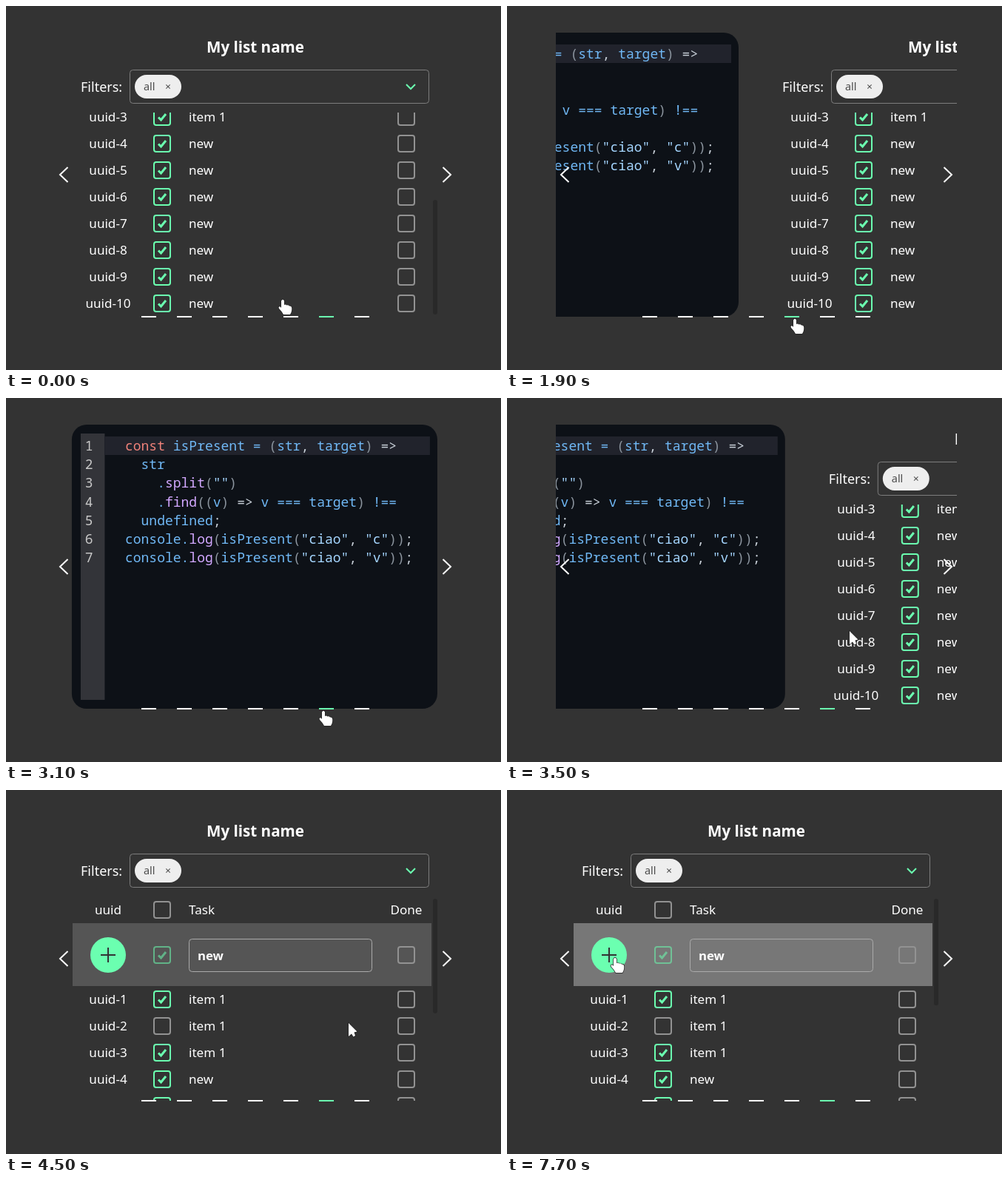
Write an HTML page with a canvas that moves like this. It is 669x492 px and loops after 8 s.

```html
<!DOCTYPE html>
<html lang="en">
<head>
<meta charset="utf-8">
<title>List carousel</title>
<style>
  html, body { margin: 0; width: 100%; height: 100%; overflow: hidden; background: #333; }
  canvas { display: block; }
</style>
</head>
<body>
<canvas id="stage" width="669" height="492"></canvas>
<script>
const ctx = document.getElementById('stage').getContext('2d');
const LOOP = 8000, STEP = 100, PITCH = 542;
const BG = '#333333', GREEN = '#6bffb0', GREY = '#929292';
const SANS = '"Noto Sans", "Open Sans", sans-serif';
const MONO = '18px "Noto Sans Mono", monospace';
const VIEW = { top: 144, height: 276 };
const ROW = 36, FIRST_ROW = 265, MAX_SCROLL = 205;

const HAND = new Path2D('M-2 1.5Q0-2 2 1.5V7Q4 6 5.4 7.6Q7.5 6.8 8.8 8.6Q12 8 12.2 11V14Q12 17 10 20H1Q-1 16-5 12Q-6.3 10-4.5 9.2Q-3 9-2 11Z');
const ARROW = new Path2D('M0 0L11.5 11.5L7.5 12.5L9 17L6.5 18.5L4 14.5L0 18Z');

// Cursor path: time, x, y of the hot spot
const PATH = [
  [0, 374, 397], [300, 352, 410], [700, 421, 424], [900, 402, 424], [1100, 389, 423],
  [2500, 389, 423], [2900, 429, 423], [3100, 429, 423], [3400, 463, 315],
  [5100, 463, 315], [5700, 363, 231],
  [7000, 363, 231], [7350, 245, 238], [7700, 146, 227]
];

const COLORS = {
  k: '#f0827a', b: '#70b8f5', g: '#8b949e', w: '#c9d1d9', f: '#d2a8ff', s: '#a5d6ff'
};
// Each token is a colour key followed by its text
const CODE = [
  ['kconst ', 'bisPresent = ', 'g(', 'bstr', 'w, ', 'btarget', 'g) ', 'w=>'],
  ['b  str'],
  ['b    .', 'fsplit', 'g(', 's""', 'g)'],
  ['b    .', 'ffind', 'g((', 'bv', 'g) ', 'w=> ', 'bv === target', 'g) ', 'b!=='],
  ['b  undefined', 'w;'],
  ...['"c"', '"v"'].map(arg => [
    'bconsole.', 'flog', 'g(', 'bisPresent', 'g(', 's"ciao"', 'w, ', 's' + arg, 'g))', 'w;'
  ])
];

function easeInOut(x) {
  if (x <= 0) return 0;
  if (x >= 1) return 1;
  let lo = 0, hi = 1;
  for (let i = 0; i < 24; i++) {
    const u = (lo + hi) / 2, v = 1 - u;
    if (1.26 * u * v * v + 1.74 * u * u * v + u * u * u < x) lo = u; else hi = u;
  }
  return lo * lo * (3 - 2 * lo);
}

function cursorAt(t) {
  const i = PATH.findIndex(p => p[0] > t);
  if (i < 0) return PATH[PATH.length - 1].slice(1);
  const [t0, x0, y0] = PATH[i - 1], [t1, x1, y1] = PATH[i];
  const k = (t - t0) / (t1 - t0);
  return [x0 + (x1 - x0) * k, y0 + (y1 - y0) * k];
}

function box(x, y, w, h, r, fill, stroke, width = 1) {
  ctx.beginPath();
  ctx.roundRect(x, y, w, h, r);
  if (fill) { ctx.fillStyle = fill; ctx.fill(); }
  if (stroke) { ctx.strokeStyle = stroke; ctx.lineWidth = width; ctx.stroke(); }
}

function line(points, color, width) {
  ctx.beginPath();
  points.forEach(([x, y]) => ctx.lineTo(x, y));
  ctx.strokeStyle = color;
  ctx.lineWidth = width;
  ctx.stroke();
}

function label(text, x, y, { size = 17.1, bold = false, align = 'left', color = '#fff' } = {}) {
  ctx.font = `${bold ? 'bold ' : ''}${size}px ${SANS}`;
  ctx.textAlign = align;
  ctx.fillStyle = color;
  ctx.fillText(text, x, y);
}

function clip(x, y, w, h) {
  ctx.beginPath();
  ctx.rect(x, y, w, h);
  ctx.clip();
}

function checkbox(cx, cy, checked) {
  box(cx - 11, cy - 11, 22, 22, 3, null, checked ? GREEN : GREY, 2);
  if (checked) line([[cx - 5, cy + .5], [cx - 1.5, cy + 4], [cx + 5, cy - 4]], GREEN, 3);
}

function listRow(id, task, checked, cy) {
  label(id, 138, cy + 6, { align: 'center' });
  checkbox(211, cy, checked);
  label(task, 247, cy + 6);
  checkbox(541, cy, false);
}

function addRow(s) {
  ctx.fillStyle = s.hover ? '#777777' : '#555555';
  ctx.fillRect(90, 180, 485, 85);
  ctx.fillStyle = GREEN;
  ctx.beginPath();
  ctx.arc(138, 223, 24, 0, 7);
  ctx.fill();
  line([[128, 223], [148, 223]], BG, 2);
  line([[138, 213], [138, 233]], BG, 2);
  ctx.globalAlpha = .55;
  checkbox(211, 223, true);
  ctx.globalAlpha = 1;
  checkbox(541, 223, false);
  if (s.focus) {
    ctx.save();
    ctx.shadowColor = GREEN;
    ctx.shadowBlur = 4;
    box(247, 200.5, 249, 46, 4, null, GREEN, 2);
    ctx.restore();
  } else {
    box(247.5, 201.5, 247, 44, 4, null, '#aaaaaa');
  }
  label('new', 259, 229.5, { size: 16.8, bold: true });
  if (s.caret) {
    ctx.fillStyle = '#fff';
    ctx.fillRect(294, 213, 1, 20);
  }
}

function drawList(s) {
  label('My list name', 337, 63, { size: 20.6, bold: true, align: 'center' });
  label('Filters:', 101, 115.5, { size: 18 });
  box(167.5, 86.5, 404, 45, 4, null, '#7d7d7d');
  box(174, 93, 63, 32, 16, '#eeeeee');
  label('all', 186, 114, { size: 14.4, color: '#4a4a4a' });
  line([[216.3, 106.3], [221.7, 111.7]], '#555', 1.1);
  line([[221.7, 106.3], [216.3, 111.7]], '#555', 1.1);
  line([[541, 106], [547, 112], [553, 106]], GREEN, 2);

  ctx.save();
  clip(60, VIEW.top, 540, VIEW.height);
  ctx.save();
  ctx.translate(0, -s.scroll);
  label('uuid', 138, 168, { align: 'center' });
  checkbox(211, 162, false);
  label('Task', 247, 168);
  label('Done', 541, 168, { align: 'center' });
  addRow(s);
  for (let i = 1; i <= s.rows; i++) {
    listRow('uuid-' + i, i < 4 ? 'item 1' : 'new', i !== 2, FIRST_ROW + ROW * (i - .5));
  }
  ctx.restore();
  const total = FIRST_ROW - VIEW.top + ROW * s.rows, track = 270;
  box(577, 147 + s.scroll / total * track, 6, VIEW.height / total * track, 3, '#292929');
  ctx.restore();
}

function drawCode() {
  box(90, 36, 494, 384, 20, '#0d1117');
  ctx.fillStyle = '#333439';
  ctx.fillRect(102, 48, 32.5, 360);
  ctx.fillStyle = '#21232c';
  ctx.fillRect(134.5, 52, 439.5, 25);
  ctx.font = MONO;
  ctx.textAlign = 'left';
  CODE.forEach((tokens, i) => {
    const y = 71 + i * 25.2;
    let x = 162;
    ctx.fillStyle = '#c8c8c8';
    ctx.fillText(i + 1, 107.7, y);
    for (const token of tokens) {
      const text = token.slice(1);
      ctx.fillStyle = COLORS[token[0]];
      ctx.fillText(text, x, y);
      x += ctx.measureText(text).width;
    }
  });
}

function drawCursor(t, x, y) {
  ctx.save();
  ctx.translate(x, y);
  if (t >= 5200 && x > 246 && y < 247) {
    for (const [color, width] of [['#ffffff', 3], ['#222222', 1]]) {
      line([[0, -8], [0, 8]], color, width);
      line([[-3, -8], [3, -8]], color, width);
      line([[-3, 8], [3, 8]], color, width);
    }
  } else {
    const hand = t < 3100 || y > 416 || x < 162;
    const shape = hand ? HAND : ARROW;
    ctx.strokeStyle = '#222222';
    ctx.lineWidth = 1.4;
    ctx.stroke(shape);
    ctx.fillStyle = '#fff';
    ctx.fill(shape);
  }
  ctx.restore();
}

function draw(t) {
  const [cx, cy] = cursorAt(t);
  const slide = PITCH * (easeInOut((t - 1400) / 1000) - easeInOut((t - 3068) / 1000));
  const focus = t >= 5600 && t < 7600;
  const state = {
    scroll: t < 4500 ? MAX_SCROLL : 0,
    rows: t < 7700 ? 10 : 11,
    hover: t >= 5200 && cy < FIRST_ROW,
    focus,
    caret: focus && (t < 5700 || Math.floor((t - 5700) / 600) % 2 === 0)
  };

  ctx.fillStyle = BG;
  ctx.fillRect(0, 0, 669, 492);

  ctx.save();
  clip(66, 36, 542, 384);
  ctx.translate(slide, 0);
  if (slide < PITCH) drawList(state);
  ctx.translate(-PITCH, 0);
  if (slide > 0) drawCode();
  ctx.restore();

  const active = t >= 1400 && t < 3100 ? 4 : 5;
  for (let i = 0; i < 7; i++) {
    ctx.fillStyle = i === active ? GREEN : '#fff';
    ctx.fillRect(183 + 48 * i, 419, 20, 2);
  }
  line([[83.5, 218], [73, 228], [83.5, 238]], '#fff', 2);
  line([[590.5, 218], [601, 228], [590.5, 238]], '#fff', 2);
  drawCursor(t, cx, cy);
}

const start = performance.now();
function tick() {
  const t = (performance.now() - start) % LOOP;
  draw(Math.floor(t / STEP) * STEP);
  requestAnimationFrame(tick);
}
tick();
</script>
</body>
</html>
```
